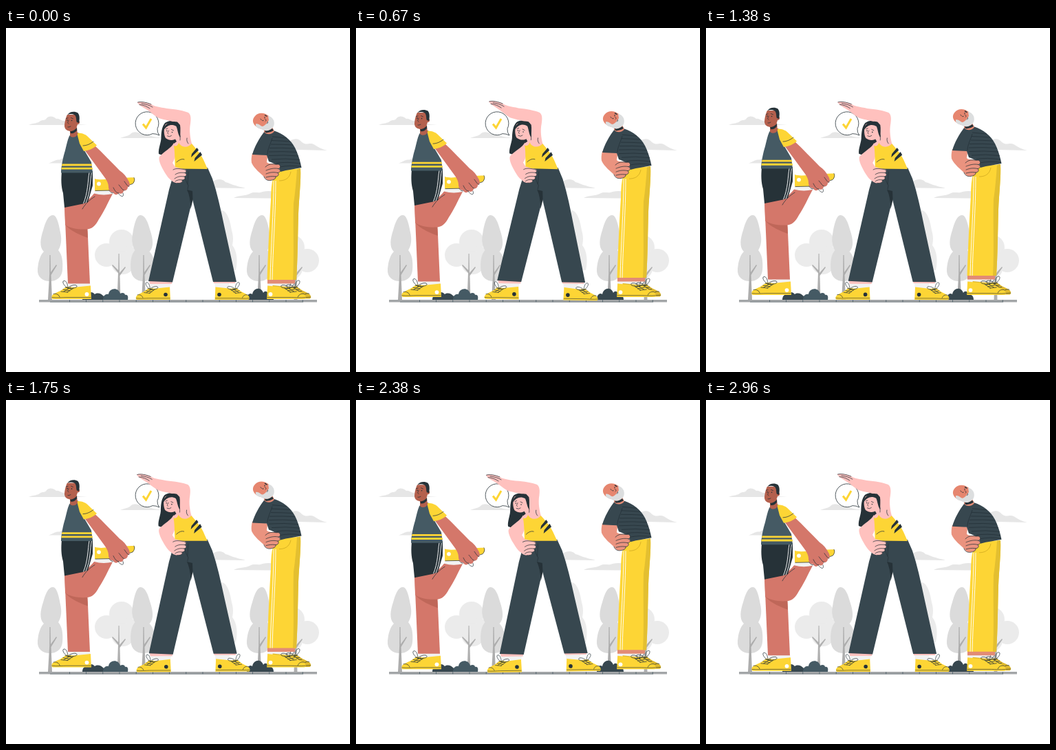
Animation of 500x500 px, one loop 3 s. Source, as an HTML page:

```html
<!DOCTYPE html>
<html lang="en">
<head>
<meta charset="utf-8">
<title>Stretching</title>
<style>
html, body { margin: 0; width: 100%; height: 100%; overflow: hidden; background: #fff; }
svg { display: block; width: 100%; height: 100%; }
.line { fill: none; stroke: #263238; stroke-width: .75; stroke-linecap: round; stroke-linejoin: round; }
.thin { fill: none; stroke: #1f2b31; stroke-width: .6; }
.white { fill: none; stroke: #fff; stroke-width: .9; }
.y { fill: #fdd535; }
.slate { fill: #455a64; }
.pants { fill: #37474f; }
.ink { fill: #263238; }
.tan { fill: #d4776a; }
.brown { fill: #b4604d; }
.pink { fill: #ffc1be; }
.rose { fill: #ea937f; }
.sock { fill: #f2f2f2; }
</style>
</head>
<body>
<svg viewBox="0 0 500 500">
<defs>
  <path id="crown" fill="#dbdbdb" d="M4 272C10 272 13 286 15 297C18 310 15 318 12 323C18 330 19 340 18 352C17 362 10 368 0 368C-11 368-19 362-18 350C-17 338-14 330-9 325C-16 318-14 306-10 294C-7 283-3 272 4 272Z"/>
  <g id="puff" fill="#ebebeb">
    <circle cx="4" cy="311" r="18"/><circle cx="-18" cy="330" r="17"/>
    <circle cx="14" cy="331" r="14"/><circle cx="6" cy="341" r="17"/>
  </g>
  <path id="trunk" fill="#adadad" d="M-3 395L-.8 357-.6 330H.6L1 355 9 344 10 345 1.500 359 3 395Z"/>
  <path id="twig" fill="#b0b0b0" d="M-2.500 395L-1 356-10 345-9 344-.8 352-.5 328H.6L1 356 9 347 10 348 1.500 360 2.500 395Z"/>
  <!-- shoe pointing left, toe tip at the origin -->
  <g id="shoe">
    <path d="M.3-3C1-7.500 7-9 13-12L22-18 32-17 57-19.500 58 0H2Q-.3-.8 .3-3Z"/>
    <path class="thin" d="M.6-2.400C8-1.400 16-2.400 22-2.400H57.500"/>
    <path class="line" d="M3-7.500C8-8.500 11-6 12-3M14-11L24-10M17-14L27-12M20-17L30-14.500M18-11L28-17M23-10L32-16"/>
    <path class="line" d="M24-16C18-19 15-25.500 18-26.500C22-27.500 24-20 24-16C27-20 36-22 37-19C38-16 28-15 24-16"/>
  </g>
</defs>

<g fill="#e6e6e6">
  <path d="M33 141C40 138 46 139 50 135C54 133 57 135 59 131C63 127 69 128 73 132C77 131 80 135 84 135C92 136 98 140 118 141Z"/>
  <path d="M62 196.500C69 194 72 191 78 191.500C86 186 94 190 110 196.500Z"/>
  <path d="M166 160C174 157 178 157 181 154C185 150 192 151 196 154C203 153 208 158 227 160Z"/>
  <path d="M386 176C400 174 408 170 413 164C419 160 426 160 430 166C436 170 438 168 443 168C449 168 451 174 467 178Z"/>
  <path d="M278 232C290 230 296 227 301 223C306 219 315 219 319 224C324 225 328 228 334 229C338 231 343 231 348 233Z"/>
  <path d="M331 247C338 243 348 244 354 241C361 237 367 241 373 238C385 235 399 239 408 244L427 248Z"/>
</g>

<use href="#crown" x="64"/><use href="#trunk" x="64"/>
<use href="#puff" x="164"/>
<use href="#crown" transform="translate(199.500) scale(-1 1)"/><use href="#trunk" x="200"/>
<use href="#twig" x="164"/>
<path fill="#ebebeb" d="M313 265C321 265 326 280 328 294C331 304 330 310 329 316C336 324 337 340 334 352L312 350Z"/>
<use href="#crown" x="368"/><use href="#trunk" x="368"/>
<use href="#puff" transform="translate(420 8) scale(-1 1)"/>
<use href="#twig" x="421"/>

<path class="pants" d="M111 395C111 389 115 386 118 388C120 383 126 383 129 387C133 384 139 386 142 390C144 388 148 389 149 395Z"/>
<path class="slate" d="M141 395C141 389 145 386 149 387C150 378 163 376 166 386C169 384 173 385 173 388C177 387 178 391 177 395Z"/>
<path class="pants" d="M350 395C350 388 354 384 358 387C360 377 371 376 374 385C376 381 381 383 382 388C387 387 389 391 389 395Z"/>
<path fill="#a3a6a8" d="M48 395H452V398.500H48Z"/>
<path d="M64 398.200H432" stroke="#5f6b70" stroke-width=".7"/>
<path d="M92 396.800H433" stroke="#455a64" stroke-width="3" stroke-dasharray=".8 23.400"/>

<path d="M220 146.500A16.900 16.900 0 1 0 213 153.600Q218 153.500 223 156Q219.500 152 220 146.500Z" fill="#fff" stroke="#263238" stroke-width=".8"/>
<path d="M199 139.500L203.500 145L211 132" fill="none" stroke="#fdd535" stroke-width="3"/>

<g class="float">
  <path class="sock" d="M91 369H122L123 378H92Z"/>
  <use href="#shoe" class="y" transform="translate(66 394)"/>
  <circle cx="117.500" cy="387" r="2.900" fill="#fff"/>
  <path class="tan" d="M85 257L90 371.500H122L118.500 292Z"/>
  <path fill="#bf6759" d="M86 286L118 291 119 305C108 301 95 296 86 286Z"/>
  <path class="sock" d="M129 235L159 235 154 243 128 241.500Z"/>
  <path class="tan" d="M85 256L113 254C119 250 124 246 128 240.500C137 243 146 243 155 241C148 254 142 268 135 278C130 288 124 293 116 292.500C104 293 93 291 86 286Z"/>
  <path class="line" d="M111 263C115 256 121 250 129 245"/>
  <path class="ink" d="M81 208H126L126 229 119 253 112 255.500 85 261 83 240C80 230 80 220 81 208Z"/>
  <path class="white" d="M121 210C119 222 119 240 112.500 255M124.500 210C122 222 123 238 116 254"/>
  <path class="y" d="M129 219C137 222 150 219 163 219C172 218 178 217 186 217.500C188 219 187 223 185 226L155 236 129 236.500Z"/>
  <path class="line" d="M130 236.500L155 236 184 226.500C187 223 187.500 220 186 217.500"/>
  <circle cx="135" cy="226.500" r="2.900" fill="#fff"/>
  <path class="line" d="M162 239C168 247 172 246 170 240M150 236C154 243 160 239 158 235"/>
  <path class="tan" d="M114 177L129 171C141 182 153 195 165 207C171 211 175 216 178 222C181 227 180 231 177 231C177 235 174 237 171 236C171 240 167 242 164 240C162 243 157 243 156 239C152 239 149 236 149 231C149 227 147 222 144 218Z"/>
  <path class="line" d="M179 230C177 231 175 227 172 223M172 236C169 236 167 231 164 228M164 240C160 240 158 236 156 232"/>
  <path class="slate" d="M92 157C95 153 99 152 105 152L114 178 124 195 126 210.500H80C80 203 83 187 86 178C88 170 89 164 92 157Z"/>
  <path class="y" d="M81.500 197.600H124.500L125.200 200.400H81ZM80.800 202.800H125.600L126 205.600H80.400Z"/>
  <path class="y" d="M103 152.500C110 152 117 155 120 159L132 170.500C126 176 120 178 113 179L107 168Z"/>
  <path class="line" d="M112 171C118 171 123 168 127 165"/>
  <path class="brown" d="M93 148L103 144 104 155C102 159 96 160 93 157Z"/>
  <path class="ink" d="M93 149Q100 149 103 145L103 149Q99 154 94 153Z"/>
  <path class="brown" d="M89 126C86 132 85 139 85 143C86 149 91 150 95 150C100 149 103 145 104 140C108 140 108 135 105 134L103 126Z"/>
  <path class="ink" d="M89.500 126C92 121.500 100 120.500 104.500 123.500C107.500 127 107 133 106 138L103 137C101.500 134 103 130 100 126.500Q95 123.800 89.500 126Z"/>
  <path class="line" d="M87.500 131.500L90 130.800M94.500 130.500L97.500 131.800M91 134C90 137 88.500 138 91 139M90 144Q92 144.500 94 143"/>
  <circle class="ink" cx="89" cy="134" r=".8"/><circle class="ink" cx="95.500" cy="134.500" r=".8"/>
</g>

<g class="sway">
  <path class="ink" d="M231 138C236 134 247 133 252 139C255 146 253 156 255 163L246 167C240 171 239 181 231 184.500Q226 185 222 183C221 175 226 166 225.500 158C226 149 227 143 231 138Z"/>
  <path class="pink" d="M244 158L252 152 256 167 270 168 285 188 247 196 243 169 248 165Z"/>
  <path class="pink" d="M244 167C241 174 230 179 223 187C221 191 225 200 229 207C233 214 238 222 243 222L250 208 242 196C246 190 247 183 247 176Z"/>
  <path class="sock" d="M209 369H240L238 378H210Z"/>
  <path class="sock" d="M303 369H324L325 378H304Z"/>
  <path class="pink" d="M208 367H242L241 372H209ZM301 367H334L333 371H302Z"/>
  <use href="#shoe" class="y" transform="translate(188.500 395) scale(.87 .95)"/>
  <use href="#shoe" class="y" transform="translate(354 395) scale(-.87 .95)"/>
  <circle class="ink" cx="232" cy="387.500" r="2.800"/>
  <circle class="ink" cx="310" cy="387.500" r="2.800"/>
  <path class="pants" d="M247 203H293L300 219C307 240 312 263 317 287L335 369H301L271 249 242 369.500 207 368 237 235Q241 220 247 203Z"/>
  <path class="ink" d="M263 235L271 237 271.500 250 268.500 263Q268 245 263 235Z"/>
  <path class="line" d="M261 207C259 215 261 222 265 229L264 234M265 209L264 227"/>
  <path class="y" d="M244 171C248 173 251 170 253 161L255 161C255 169 261 172 268 166C276 175 285 185 289 196L293 205 246 204.500C245 195 246 184 244 171Z"/>
  <path class="ink" d="M269 188L270 183 277.500 174 280 177.500ZM273.500 194L274.500 189 282.500 180 285 184.500Z"/>
  <path class="line" d="M248 195C252 191 256 190 259 191"/>
  <path class="pink" d="M251 166C253 155 252 146 251 139C242 135 231 134 222 131C215 127 209 121 202 117C197 114 192 111 191 108C195 106 203 108 210 110C214 114 224 115 234 117C246 118 258 120 265 123C269 126 269 132 268 139C266 150 268 160 270 168C264 175 254 174 251 166Z"/>
  <path class="line" d="M213 115C209 112 202 110.500 197 109.800M211 111C204 108 196 106.500 191.500 108M194 111.500C200 112 205 114 209 117M252 145C251 154 254 158 253 163M263 160C262 164 264 167 265 168"/>
  <path class="pink" d="M232 140C229 145 229 155 232 160C237 164 244 164 248 160C252 156 253 149 251 144C247 138 238 137 232 140Z"/>
  <path class="ink" d="M229 149C229 140 239 134 249 136.500L253 141C254 147 253 152 253.500 159C250 156 250 149 247.500 143C241 139 234 141 229 149Z"/>
  <path class="line" d="M232.500 147L235 146M240.500 147.500L243.500 149M236.500 149C235.500 152 233.500 153 236 154M234.500 157Q238 159 240.500 156.500"/>
  <circle class="ink" cx="233.800" cy="149.500" r=".8"/><circle class="ink" cx="241.500" cy="151.500" r=".8"/>
  <path class="pink" d="M242 204C246 200 250 204 259 205C263 206 263 210 260 210.500C264 212 262 216 259 216C262 218 259 221 256 221C258 224 254 226 249 225.500C242 225 238 220 238 214Z"/>
  <path class="line" d="M243 206C248 203 254 205 259 205.500C263 207 262 210 260 210.500C254 210 250 210 246 213M260 210.500C264 212 262 216 259 216C253 215 249 216 245 219M259 216C262 218 259 221 256 221C252 220 248 221 246 223M256 221C258 224 254 226 249 225.500"/>
</g>

<g class="float">
  <path class="sock" d="M380 369H419V378H380Z"/>
  <use href="#shoe" fill="#dfb92c" transform="translate(443.500 393.500) scale(-.98 1)"/>
  <use href="#shoe" class="y" transform="translate(436 394) scale(-.98 1)"/>
  <circle cx="384.500" cy="387" r="2.900" fill="#fff"/>
  <path fill="#e28b75" d="M380 364H420V371.500H380Z"/>
  <path class="y" d="M397 207L428 204C429 222 426 246 425 270C424 305 424 335 422 366H379.500C381 322 383 280 385 250Q385 230 388 219Z"/>
  <path fill="#e3bf30" d="M428 204C429 222 426 246 425 270C424 305 424 335 422 366H417C419 330 417 290 418 255Q421 235 423 205Z"/>
  <path class="white" d="M389 222C389 268 385 320 384 366M392 222C392 268 388 320 387 366"/>
  <path d="M397 222C405 222 412 219 414 209" fill="none" stroke="#c9a21d" stroke-width=".7"/>
  <path class="rose" d="M358 182L380 185C380 190 379 193 379 195C383 199 391 197 397 198L395 215 378 219C370 211 361 205 357 196Q356 190 358 182Z"/>
  <path class="pants" d="M376 150Q382 155 390 149.500C403 154 414 162 420 174C425 184 428 195 429.500 203C420 205 409 206 399 209C398 202 392 197 382 194L379 185 358 184C361 173 368 160 376 150Z"/>
  <path class="thin" d="M387 158Q399 159 408 160M386 163.500Q400 164 413 165M385 169Q401 169 417 170M383 174.500Q402 174 420 175M382 180Q403 179 423 180.500M382 185.500Q404 184 425 186M386 191Q406 189 427 191.500M393 196.500Q408 194 428 197M398 202Q412 199 429 201.500M387 160C384 170 380 176 380 184"/>
  <path fill="#e28b75" d="M375 147L386 142 390 150C386 156 378 155 375 151Z"/>
  <path class="ink" d="M376 149Q382 150 387 146L389 149Q383 153 377 152Z"/>
  <path fill="#e6866f" d="M362 128C367 122 376 123 382 128C386 133 386 142 380 146C373 149 363 145 360 139C358 135 359 131 362 128Z"/>
  <path fill="#dcdedf" d="M381 128C384 128 387 130 389 134C391 140 389 145 385 147C380 151 374 149 370 146.500C366 146 362 143 363 139.500C367 138 369 142 373 143C378 141 379 138 382 134Z"/>
  <path class="line" d="M370 132L371.500 134M376 132C378 133 379 134 377 135.500M380.500 136.500Q381 138 379.500 139"/>
  <path d="M376 126.500L379.500 128.500" stroke="#263238" stroke-width="1.400"/>
  <circle class="ink" cx="376" cy="130" r=".8"/><circle class="ink" cx="373.500" cy="134.500" r=".8"/>
  <path class="rose" d="M377 200C383 195 390 199 396 198C400 200 399 204 396 204.500C400 206 399 210 395 210.500C398 213 395 216 392 216C393 219 389 221 384 221.500C378 222 374 217 374 210Z"/>
  <path class="line" d="M377 202C384 195 390 199 396 198C400 200 399 204 396 204.500C389 203 383 205 378 207M396 204.500C400 206 399 210 395 210.500C388 209 383 210 378 212M395 210.500C398 213 395 216 392 216C386 215 382 216 378 217M392 216C393 219 389 221 384 221.500C380 222 376 220 375 216"/>
</g>
</svg>
<script>
const LOOP = 3000, FPS = 24, LIFT = 6.5, TILT = 1;
const floats = document.querySelectorAll('.float');
const sway = document.querySelector('.sway');
const triangle = p => 1 - Math.abs(1 - 2 * p);   // 0 → 1 → 0
const start = performance.now();

function draw(now) {
  const t = Math.max(0, now - start) % LOOP;
  const p = Math.floor(t * FPS / 1000) / (FPS * LOOP / 1000);
  const y = -LIFT * triangle(p);
  const angle = TILT * (2 * triangle((p + .25) % 1) - 1);
  floats.forEach(g => g.setAttribute('transform', `translate(0 ${y})`));
  sway.setAttribute('transform', `rotate(${angle} 271 251)`);
  requestAnimationFrame(draw);
}
draw(start);
</script>
</body>
</html>
```
